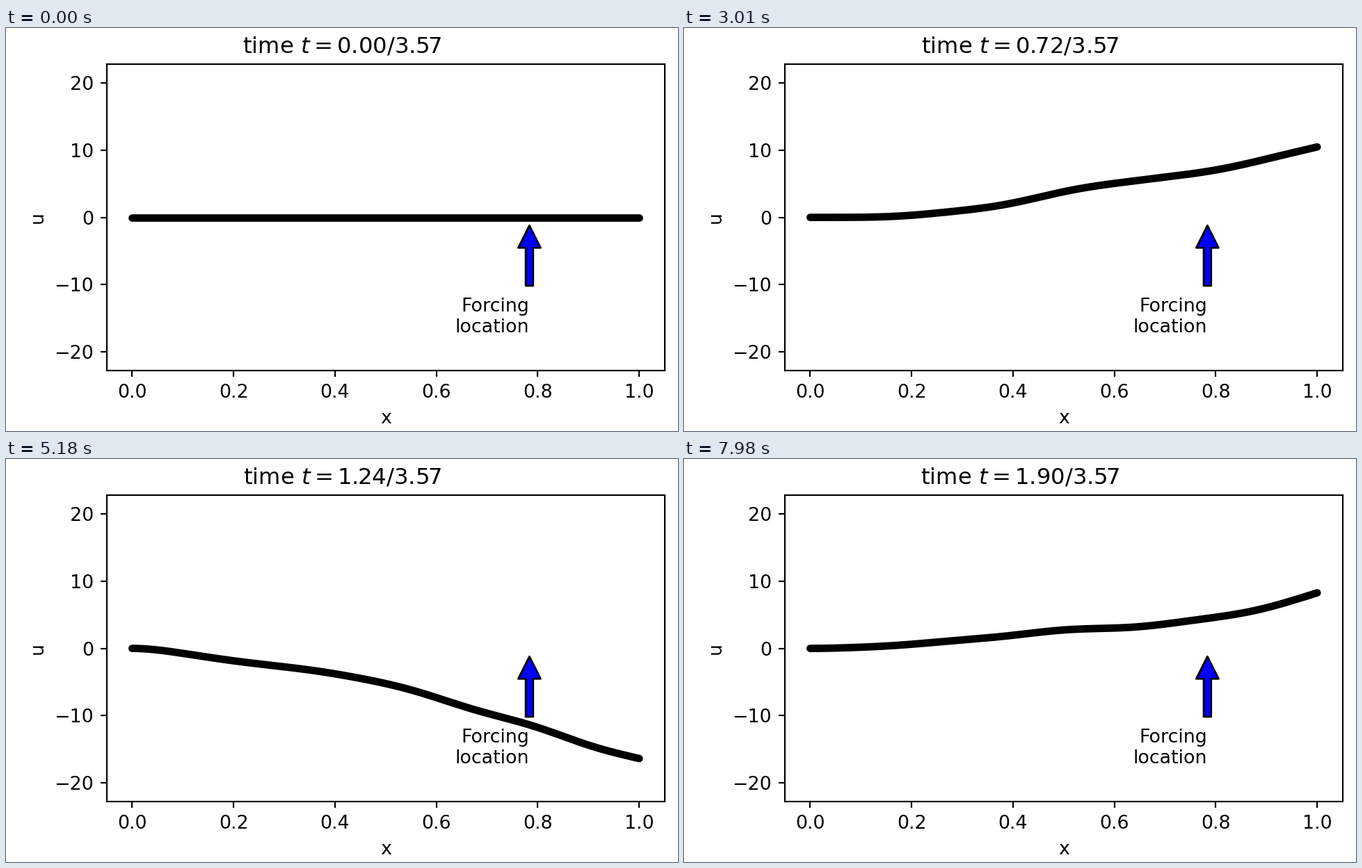
These frames come from a looping animation (966x580 px, 8 s). A matplotlib script:

```python
import numpy as np
import matplotlib.pyplot as plt
from matplotlib.animation import FuncAnimation

# Impulse response of a clamped-free beam, as a sum of vibration modes
MODES = 10
IMPULSE = 22.0
X_FORCE = 0.78344          # node of the second mode
Y_MAX = 22.8

TICK = 20                  # ms per animation frame
STEP = 70                  # ms per beam pose
LOOP = 8000
STEPS_PER_RUN = 214        # poses in two periods of the first mode


def wave_number(n):
    """n-th root of cos(b) cosh(b) = -1."""
    b = (n - 0.5) * np.pi
    for _ in range(20):
        g = np.cos(b) + 1 / np.cosh(b)
        slope = -np.sin(b) - np.sinh(b) / np.cosh(b) ** 2
        b -= g / slope
    return b


def mode_shape(b, x):
    """Unit-norm cantilever mode, written to avoid cancellation."""
    s, c = np.sin(b), np.cos(b)
    gap = (s - c - np.exp(-b)) / (np.sinh(b) + s)
    sigma = 1 - gap
    return (sigma * np.sin(b * x) - np.cos(b * x)
            + (1 + sigma) / 2 * np.exp(-b * x) + gap / 2 * np.exp(b * x))


betas = [wave_number(n) for n in range(1, MODES + 1)]
total = 4 * np.pi / betas[0] ** 2
x = np.linspace(0, 1, 201)
shapes = [IMPULSE * mode_shape(b, X_FORCE) / b ** 2 * mode_shape(b, x)
          for b in betas]


def beam(t):
    return sum(s * np.sin(b ** 2 * t) for b, s in zip(betas, shapes))


# 966 x 580 pixels
fig, ax = plt.subplots(figsize=(5.0001, 3.0021), dpi=193.2)
fig.subplots_adjust(left=0.15, right=0.98, bottom=0.15, top=0.91)
ax.set_xlim(-0.05, 1.05)
ax.set_ylim(-Y_MAX, Y_MAX)
ax.set_xticks(np.arange(6) / 5)
ax.set_yticks(np.arange(-20, 21, 10))
ax.set_xlabel("x")
ax.set_ylabel("u")
ax.annotate("Forcing\nlocation", xy=(X_FORCE, 0),
            xytext=(X_FORCE, -0.75 * Y_MAX), ha="right",
            arrowprops=dict(facecolor="blue", shrink=0.1))
line, = ax.plot(x, 0 * x, "k", lw=4, solid_capstyle="round",
                solid_joinstyle="round")
title = fig.suptitle("")


def update(i):
    step = int((i + 0.5) * TICK // STEP)
    t = step * total / STEPS_PER_RUN
    line.set_ydata(beam(t))
    title.set_text(rf"time $t={t:.2f}/{total:.2f}$")
    return line, title


anim = FuncAnimation(fig, update, frames=LOOP // TICK, interval=TICK,
                     repeat=True, repeat_delay=0)
plt.show()
```
